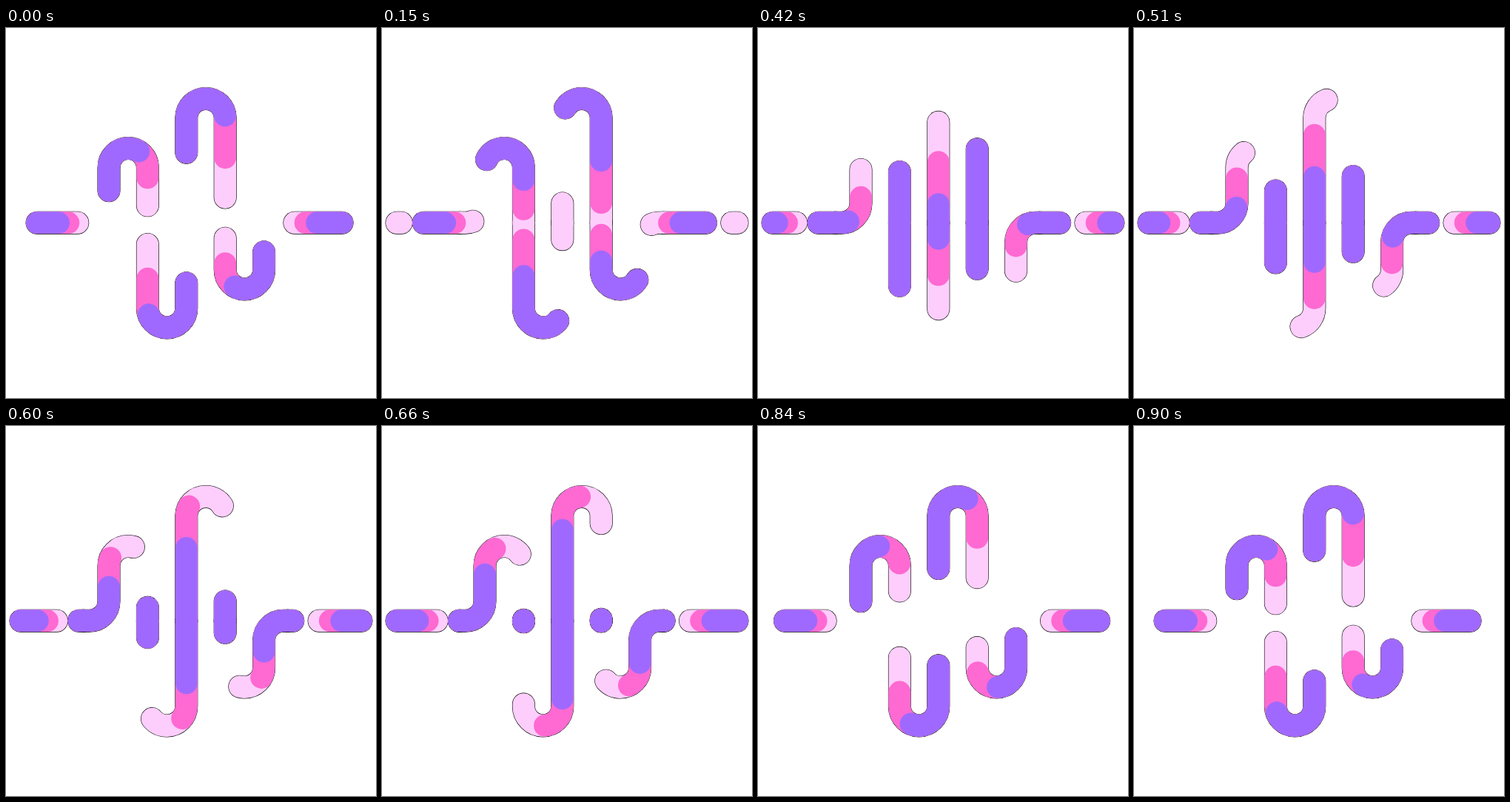
An HTML page with a canvas that plays this animation: 500 px wide and 500 px high, repeating every 0.93 s.

```html
<!DOCTYPE html>
<html lang="en">
<head>
<meta charset="utf-8">
<title>Flowing wave</title>
<style>
  html, body { margin: 0; width: 100%; height: 100%; overflow: hidden; background: #fff; }
  canvas { display: block; }
</style>
</head>
<body>
<canvas id="stage" width="500" height="500"></canvas>
<script>
const ctx = document.getElementById('stage').getContext('2d');

const LOOP = 930, STEP = 30, STEPS = 30;
const RADIUS = 26.2, MID = 263.2, TAIL = 0.26;
const column = i => 139 + i * 2 * RADIUS;

// Dash lengths are fractions of a track, painted from back to front.
const LAYERS = [
  { color: '#000', length: 0.645, width: 31 },
  { color: '#fdcefc', length: 0.645, width: 29.8 },
  { color: '#ff69d2', length: 0.498, width: 29.8 },
  { color: '#9f69ff', length: 0.342, width: 29.8 }
];

// Right-angled route with rounded corners.
function makeTrack(...points) {
  const path = new Path2D();
  let length = 0;
  path.moveTo(...points[0]);
  for (let i = 1; i < points.length; i++) {
    const [px, py] = points[i - 1], [x, y] = points[i];
    length += Math.abs(x - px) + Math.abs(y - py);
    if (i < points.length - 1) {
      path.arcTo(x, y, ...points[i + 1], RADIUS);
      length -= RADIUS * (2 - Math.PI / 2);
    } else {
      path.lineTo(x, y);
    }
  }
  return { path, length };
}

// Leaves the middle line in one column and returns to it in another.
const arch = (from, to, y) =>
  [[from, MID], [from, y], [to, y], [to, MID]];

const LEFT = 104.8, RIGHT = 380.5;
const tracks = [
  makeTrack([20, MID], [LEFT, MID]),
  makeTrack([LEFT, MID], ...arch(column(0), column(1), 162.5)),
  makeTrack(...arch(column(2), column(1), 405)),
  makeTrack(...arch(column(2), column(3), 95.4)),
  makeTrack([RIGHT, MID], ...arch(column(4), column(3), 353)),
  makeTrack([480, MID], [RIGHT, MID])
];

function drawDash({ path, length }, from, to) {
  const start = Math.max(0, from), end = Math.min(1, to);
  if (end <= start) return;
  ctx.setLineDash([(end - start) * length, 2000]);
  ctx.lineDashOffset = -start * length;
  ctx.stroke(path);
}

function draw(now) {
  const phase = Math.floor((now % LOOP) / STEP) / STEPS % 1;
  ctx.fillStyle = '#fff';
  ctx.fillRect(0, 0, 500, 500);
  ctx.lineCap = ctx.lineJoin = 'round';
  for (const { color, length, width } of LAYERS) {
    ctx.strokeStyle = color;
    ctx.lineWidth = width;
    for (const track of tracks) {
      for (const lap of [-1, 0]) {
        const tail = TAIL + phase + lap;
        drawDash(track, tail, tail + length);
      }
    }
  }
}

const origin = performance.now();
function tick() {
  draw(performance.now() - origin);
  requestAnimationFrame(tick);
}
tick();
</script>
</body>
</html>
```
